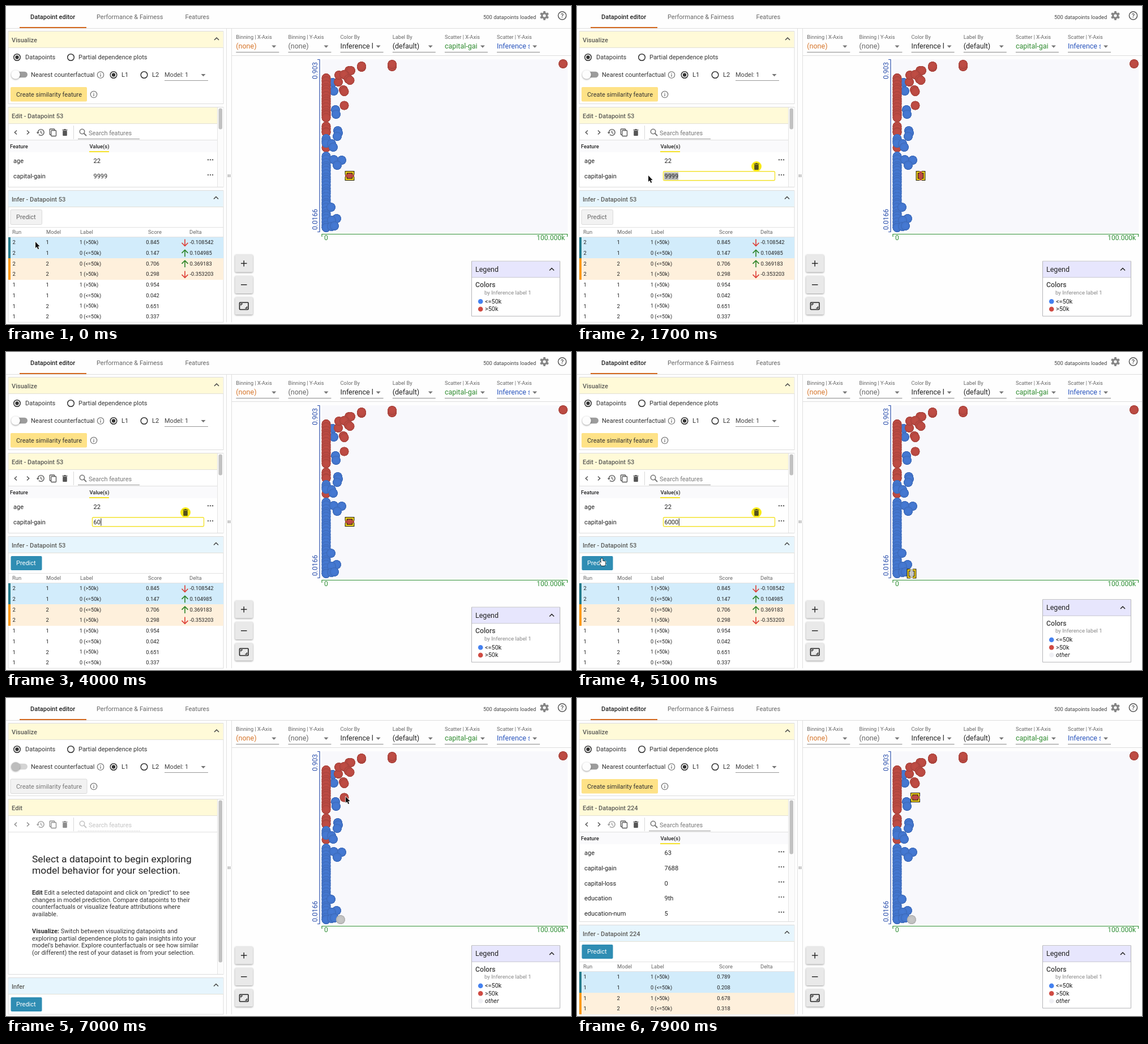
An HTML page with a canvas for the animation above (8000 ms loop, 998 px wide and 561 px high).

```html
<!DOCTYPE html>
<html lang="en">
<head>
<meta charset="utf-8">
<title>Datapoint editor</title>
<style>
html, body { margin: 0; width: 100%; height: 100%; overflow: hidden; background: #fefefe; }
canvas { display: block; }
</style>
</head>
<body>
<canvas id="stage" width="998" height="561"></canvas>
<script>
const c = document.getElementById('stage').getContext('2d');
const LOOP = 8000;
const RED = '#bf4c44', BLUE = '#4579d3', GRAY = '#c6c6c6';
const DARK = '#222', MID = '#666';

// ---------- helpers ----------
function text(s, x, y, size = 11, color = DARK, weight = 400, align = 'left') {
  c.font = `${weight} ${size}px Roboto, sans-serif`;
  c.textAlign = align;
  c.fillStyle = color;
  c.fillText(s, x, y + size * 0.355);
}
function rect(x, y, w, h, fill) { c.fillStyle = fill; c.fillRect(x, y, w, h); }
function round(x, y, w, h, r, fill, stroke, lw = 1) {
  c.beginPath();
  c.roundRect(x, y, w, h, r);
  if (fill) { c.fillStyle = fill; c.fill(); }
  if (stroke) { c.strokeStyle = stroke; c.lineWidth = lw; c.stroke(); }
}
function circle(x, y, r, fill, stroke, lw = 1) {
  c.beginPath();
  c.arc(x, y, r, 0, Math.PI * 2);
  if (fill) { c.fillStyle = fill; c.fill(); }
  if (stroke) { c.strokeStyle = stroke; c.lineWidth = lw; c.stroke(); }
}
function line(pts, color, lw = 1) {
  c.beginPath();
  for (let i = 0; i < pts.length; i += 2) c.lineTo(pts[i], pts[i + 1]);
  c.strokeStyle = color;
  c.lineWidth = lw;
  c.stroke();
}
function poly(pts, fill) {
  c.beginPath();
  for (let i = 0; i < pts.length; i += 2) c.lineTo(pts[i], pts[i + 1]);
  c.closePath();
  c.fillStyle = fill;
  c.fill();
}
function at(x, y, draw) { c.save(); c.translate(x, y); draw(); c.restore(); }
function shadow(on) {
  c.shadowColor = on ? 'rgba(0,0,0,.4)' : 'transparent';
  c.shadowBlur = on ? 3 : 0;
  c.shadowOffsetY = on ? 1 : 0;
}

// ---------- icons ----------
const chevron = (x, y, color = '#444') => line([x - 4, y + 2, x, y - 2, x + 4, y + 2], color, 1.5);
const caretDown = (x, y) => poly([x - 4, y - 2, x + 4, y - 2, x, y + 2.2], '#777');
function trash(x, y, color) {
  rect(x - 4.5, y - 5, 9, 1.4, color);
  rect(x - 1.8, y - 6, 3.6, 1.2, color);
  round(x - 3.8, y - 3, 7.6, 9, 1, color);
}
function info(x, y) {
  circle(x, y, 5.7, null, MID, 1.1);
  rect(x - 0.6, y - 0.8, 1.2, 4, MID);
  rect(x - 0.6, y - 3, 1.2, 1.3, MID);
}
function radio(x, y, on) {
  circle(x, y, 5.8, null, '#333', 1.5);
  if (on) circle(x, y, 3.2, '#333');
}
function gear(x, y) {
  at(x, y, () => {
    for (let i = 0; i < 6; i++) {
      c.rotate(Math.PI / 3);
      poly([-2.2, -4, -1.7, -8, 1.7, -8, 2.2, -4], '#858585');
    }
    circle(0, 0, 4.2, null, '#858585', 3.2);
  });
}
function history(x, y, color) {
  c.beginPath();
  c.arc(x + 0.7, y, 5.4, Math.PI, Math.PI * 2.75);
  c.strokeStyle = color;
  c.lineWidth = 1.4;
  c.stroke();
  poly([x - 7.4, y - 0.3, x - 2, y - 0.3, x - 4.7, y + 2.6], color);
  line([x + 0.6, y - 3, x + 0.6, y + 0.5, x + 3.2, y + 2], color, 1.2);
}
function delta(y, up) {
  const d = up ? -1 : 1, col = up ? '#2b8427' : '#dd3b33';
  line([316, y - 6 * d, 316, y + 5.5 * d], col, 1.6);
  line([310.5, y + 0.3 * d, 316, y + 5.8 * d, 321.5, y + 0.3 * d], col, 1.6);
}

// ---------- header and toolbar ----------
function header() {
  text('Datapoint editor', 43, 19.5, 11, DARK, 500);
  text('Performance & Fairness', 160, 19, 11, MID);
  text('Features', 316.5, 19, 11, MID);
  rect(0, 39, 998, 1, '#dedede');
  rect(24, 37, 118, 2, '#d4691f');
  text('500 datapoints loaded', 843, 19.5, 9.4, '#444');
  gear(951, 17);
  circle(982.5, 17, 7.1, null, '#555', 1.5);
  text('?', 982.5, 17.2, 11, '#555', 500, 'center');
}
const MENUS = [
  ['Binning | X-Axis', '(none)', '#d6752a'],
  ['Binning | Y-Axis', '(none)', MID],
  ['Color By', 'Inference label 1', DARK],
  ['Label By', '(default)', DARK],
  ['Scatter | X-Axis', 'capital-gain', '#2f8b2f'],
  ['Scatter | Y-Axis', 'Inference score 1', '#2a55bd']
];
function menus() {
  MENUS.forEach(([label, value, color], i) => {
    const x = 406.3 + i * 92.15;
    text(label, x, 54.5, 9.25, MID);
    c.save();
    c.beginPath();
    c.rect(x - 1, 60, 59, 20);
    c.clip();
    text(value, x, 71, 12.5, color);
    c.restore();
    caretDown(x + 67, 71.5);
    rect(x, 81, 76, 1, '#888');
  });
  rect(398, 87, 600, 1, '#dedede');
  rect(389, 40, 1, 518, '#e0e0e0');
  rect(398, 40, 1, 518, '#e0e0e0');
  rect(392, 297, 1, 5, '#777');
  rect(395, 297, 1, 5, '#777');
}

// ---------- left side ----------
function panel(y0, y1, title, tint) {
  round(4, y0 + 0.5, 380, y1 - y0 - 1, 0, '#fff', '#dcdcdc');
  rect(4.5, y0 + 1, 379, 29, tint);
  rect(4, y0 + 29, 380, 1, '#e2e0d6');
  text(title, 10, y0 + 16, 11.05, '#5c5c58', 500);
}
function visualize(idle) {
  panel(44, 173, 'Visualize', '#fffad8');
  chevron(372, 58);
  radio(19.5, 90.5, true);
  text('Datapoints', 34, 90.5, 11, '#333');
  radio(114.5, 90.5, false);
  text('Partial dependence plots', 128, 90.5, 11, '#333');
  round(12, 115.8, 26, 10.5, 5.2, idle ? '#d4d4d4' : '#9c9c9c');
  shadow(true);
  circle(17, 121, 7.8, idle ? '#bdbdbd' : '#fdfdfd');
  shadow(false);
  text('Nearest counterfactual', 44, 121, 11, '#333');
  info(167, 121.5);
  radio(190, 121.5, true);
  text('L1', 204, 121.5, 11, '#333');
  radio(244, 121.5, false);
  text('L2', 258, 121.5, 11, '#333');
  text('Model: 1', 280, 121.5, 11, '#444');
  caretDown(348.5, 122);
  rect(280, 131, 77, 1, '#999');
  if (idle) round(8, 143, 135, 25.5, 2, '#f2f2f2', '#dadada');
  else round(8, 143, 135, 25.5, 2, '#fee287');
  text('Create similarity feature', 18, 156, 10.95, idle ? '#777' : '#333');
  info(155, 156);
}
const HELP = [
  'Edit a selected datapoint and click on "predict" to see',
  'changes in model prediction. Compare datapoints to their',
  'counterfactuals or visualize feature attributions where',
  'available.', '',
  'Switch between visualizing datapoints and',
  'exploring partial dependence plots to gain insights into your',
  "model's behavior. Explore counterfactuals or see how similar",
  '(or different) the rest of your dataset is from your selection.'
];
function helpText() {
  text('Select a datapoint to begin exploring', 46, 284, 17.4);
  text('model behavior for your selection.', 46, 303.5, 17.4);
  HELP.forEach((s, i) => {
    const y = 343 + i * 12.75 + (i > 4 ? 4.3 : 0);
    const lead = i === 0 ? 'Edit ' : i === 5 ? 'Visualize: ' : '';
    text(lead, 46, y, 10.95, '#333', 700);
    const w = c.measureText(lead).width;
    text(s, 46 + w, y, 10.95, '#333');
  });
}
function tools(idle, fresh) {
  const col = idle ? '#8c8c8c' : '#555';
  line([19, 219.5, 15.3, 223, 19, 226.5], col, 1.5);
  line([37, 219.5, 40.7, 223, 37, 226.5], col, 1.5);
  history(61, 223, fresh ? '#999' : col);
  round(77.2, 217, 8.6, 10, 1, null, col, 1.3);
  round(79.7, 219.5, 8.8, 10, 1, '#fff', col, 1.3);
  trash(104, 223, col);
  rect(119, 211, 1, 24, '#d8d8d8');
  const s = idle ? '#c4c4c4' : '#777';
  circle(134.5, 221.5, 4.2, null, s, 1.6);
  line([137.5, 224.5, 142, 229], s, 1.9);
  text('Search features', 146, 224, 10.9, s);
  if (idle) for (let x = 127; x < 236; x += 3) rect(x, 234, 1.5, 1, '#ccc');
  else rect(127, 234, 109, 1, '#999');
  rect(4, 236, 369, 1, '#e0e0e0');
}
function featureRow(name, value, i) {
  const y = 273.5 + i * 26.6;
  text(name, 13, y, 11);
  text(value, 154.5, y, 11);
  for (let d = -4; d <= 4; d += 4) circle(361 + d, y - 2.2, 1.2, '#666');
}
function edit(s, bottom) {
  panel(178, bottom, s.id ? 'Edit - Datapoint ' + s.id : 'Edit', '#fffad8');
  rect(373, 179, 11, bottom - 180, '#fcfcfc');
  rect(373, 179, 1, bottom - 180, '#e4e4e4');
  round(375.5, 180.5, 6.5, s.id === 53 ? 37 : s.id ? 95 : 286, 3, '#c2c2c2');
  tools(!s.id, s.id !== 53);
  if (!s.id) return helpText();
  rect(4.5, 237, 368, 21, '#fafafc');
  text('Feature', 7, 247.5, 9.4, DARK, 500);
  text('Value(s)', 147.5, 247.5, 9.4, DARK, 500);
  rect(147, 256, 35, 2, '#f5e22c');
  if (s.id === 224) {
    [['age', '63'], ['capital-gain', '7688'], ['capital-loss', '0'],
     ['education', '9th'], ['education-num', '5']].forEach((r, i) => featureRow(r[0], r[1], i));
    return;
  }
  featureRow('age', '22', 0);
  if (s.focus) {
    round(152.5, 291.8, 197, 16, 2, '#fffffa', '#f3e32f', 1.4);
    if (s.selX < 179) rect(s.selX, 293.5, 179 - s.selX, 13, '#b5b5b5');
  }
  featureRow('capital-gain', s.value, 1);
  if (s.caret) {
    const w = (c.font = '400 11px Roboto, sans-serif', c.measureText(s.value).width);
    rect(155 + w, 293.5, 1, 13, '#222');
  }
  if (s.focus) {
    circle(317, 283, 9, '#f9ea14');
    trash(317, 283, '#54511c');
  }
}
const RUNS = [
  '2|1|1 (>50k)|0.845|-0.108542', '2|1|0 (<=50k)|0.147|0.104985',
  '2|2|0 (<=50k)|0.706|0.369183', '2|2|1 (>50k)|0.298|-0.353203',
  '1|1|1 (>50k)|0.954', '1|1|0 (<=50k)|0.042',
  '1|2|1 (>50k)|0.651', '1|2|0 (<=50k)|0.337'
];
const NEW_RUNS = [
  '1|1|1 (>50k)|0.789', '1|1|0 (<=50k)|0.208',
  '1|2|1 (>50k)|0.678', '1|2|0 (<=50k)|0.318'
];
function infer(s, top) {
  panel(top, 558.5, s.id ? 'Infer - Datapoint ' + s.id : 'Infer', '#e6f5fd');
  chevron(371, top + 13.5);
  const y = top + 34.5;
  if (s.ready) round(8.5, y + 0.5, 55, 25, 2, '#2f8db3');
  else round(8, y, 55.5, 26, 2, '#f2f2f2', '#dadada');
  text('Predict', 18, y + 13, 11, s.ready ? '#fff' : MID);
  if (!s.id) return;
  rect(4, top + 65, 380, 1, '#e2e2e2');
  ['Run', 'Model', 'Label', 'Score', 'Delta'].forEach((h, i) =>
    text(h, [11, 71, 131, 251, 324][i], top + 74, 9.4, MID));
  rect(4, top + 82, 380, 1, '#e2e2e2');
  (s.id === 53 ? RUNS : NEW_RUNS).forEach((row, i) => {
    const ry = top + 92 + i * 18.7;
    const edge = Math.round(ry - 9.3);
    if (i < 4) {
      rect(4, edge, 380, 19, i < 2 ? '#d2ecfb' : '#fef0dc');
      rect(4, edge, 4, 19, i < 2 ? '#257c8c' : '#fb9a12');
    }
    const cells = row.split('|');
    cells.forEach((v, k) => text(v, [11.5, 70.5, 130, 247.3, 324.5][k], ry, k === 2 ? 9.1 : 9.4));
    if (cells[4]) delta(ry + 0.5, cells[4][0] !== '-');
  });
}

// ---------- scatter plot ----------
function sprite(base) {
  const k = document.createElement('canvas');
  k.width = k.height = 64;
  const g = k.getContext('2d');
  const shade = g.createRadialGradient(32, 29, 8, 32, 32, 31);
  shade.addColorStop(0, 'rgba(0,0,0,0)');
  shade.addColorStop(0.7, 'rgba(0,0,0,.03)');
  shade.addColorStop(1, 'rgba(0,0,0,.14)');
  for (const f of [base, shade]) {
    g.beginPath();
    g.arc(32, 32, 31, 0, 7);
    g.fillStyle = f;
    g.fill();
  }
  return k;
}
const BALL = { [RED]: sprite(RED), [BLUE]: sprite(BLUE), [GRAY]: sprite(GRAY) };
const ball = (x, y, col) => c.drawImage(BALL[col], x - 8.3, y - 8.3, 16.6, 16.6);
function balls(col, pts) {
  for (let i = 0; i < pts.length; i += 2) ball(pts[i], pts[i + 1], col);
}
// Crowded balls merge into a band with soft seams.
function column(col, from, to, step) {
  rect(557.6, from, 15.8, to - from, col);
  for (let y = from, i = 0; y <= to; i++, y += step * (0.6 + 0.8 * Math.abs(Math.sin(i * 2.4)))) ball(565.5, y, col);
  ball(565.5, to, col);
}
const REDS = [628, 108, 628, 106, 682, 107, 682, 103, 984, 102, 606, 114, 609, 114, 587, 134, 588, 122,
  599, 122, 597, 121, 605, 129, 607.5, 131, 596, 148, 597.5, 151];
const BLUES = [582, 183, 583, 191, 586, 220, 587, 224, 585, 230, 575, 243, 578, 249,
  579, 271, 593, 272, 585, 281, 574, 355, 584, 375, 575, 378, 575, 389, 580, 388];
function marker(x, y, upright) {
  at(x, y, () => {
    if (upright) c.rotate(Math.PI / 2);
    for (const [col, w] of [['#1c1a00', 4.2], ['#f4d321', 2.2]])
      for (const d of [-1, 1]) line([-6.3, 2 * d, -6.3, 6.3 * d, 6.3, 6.3 * d, 6.3, 2 * d], col, w);
  });
}
function plot(s) {
  rect(558, 94, 434, 305, '#f8f8fc');
  const ax = '#2c50ad', gr = '#2f8f35';
  line([550, 94.5, 554, 94.5, 554, 398.5, 550, 398.5], ax, 1.2);
  line([558, 407, 558, 402.5, 991.5, 402.5, 991.5, 407], gr, 1.2);
  at(546, 114, () => { c.rotate(-Math.PI / 2); text('0.903', 0, 0, 12, ax, 400, 'center'); });
  at(546, 376.5, () => { c.rotate(-Math.PI / 2); text('0.0166', 0, 0, 12, ax, 400, 'center'); });
  text('0', 562, 409, 12, gr);
  text('100.000k', 987, 409, 12, gr, 400, 'right');

  balls(BLUE, [577, 135, 579, 150]);
  column(RED, 127, 197, 4.5);
  column(RED, 212, 223, 4);
  ball(565.5, 250, RED);
  balls(RED, REDS);
  column(BLUE, 234, 242, 4);
  column(BLUE, 265, 391, 4.5);
  balls(BLUE, BLUES);
  ball(597.5, 175.5, RED);
  ball(s.px, s.py, s.moved ? GRAY : RED);
  if (s.id === 53) marker(s.px, s.py, s.flip);
  if (s.id === 224) marker(597.5, 175.5, s.flip);
}
function zoomButtons() {
  for (const y of [454, 491.5, 529]) {
    shadow(true);
    round(404.5, y - 15.5, 31.5, 31, 2, '#e9e9e9');
    shadow(false);
  }
  rect(415, 453.4, 10.5, 1.4, '#222');
  rect(419.5, 449, 1.4, 10.5, '#222');
  rect(415, 491, 10.5, 1.4, '#222');
  round(412.5, 523, 15.5, 12.5, 1, null, '#222', 1.6);
  line([415, 528.5, 415, 525.5, 418, 525.5], '#222', 1.3);
  line([425.5, 530, 425.5, 533, 422.5, 533], '#222', 1.3);
}
function legend(moved) {
  const y = moved ? 436.5 : 450;
  round(822.5, y + 0.2, 156, 547 - y, 0, '#fff', '#b5b5b8');
  rect(823, y + 0.7, 155, 28, '#e7e6fd');
  rect(823, y + 28.3, 155, 1, '#c8c8d0');
  text('Legend', 829, y + 14.5, 12.5);
  chevron(964, y + 14.5, '#222');
  text('Colors', 829, y + 41.8, 12.2, '#444', 500);
  text('by Inference label 1', 845, y + 55.5, 9.6, '#888');
  circle(838.2, y + 71.2, 4.3, '#4481f0');
  text('<=50k', 846, y + 71, 10.9);
  circle(838.2, y + 84.7, 4.3, '#cf4a42');
  text('>50k', 846, y + 84.5, 10.9);
  if (moved) {
    circle(838.2, y + 98, 4.3, '#f0f0f4');
    text('other', 846, y + 97.5, 10.9, DARK, 'italic 400');
  }
}

// ---------- pointer ----------
const PATH = [
  [0, 52, 416], [100, 53, 414], [300, 78, 393], [600, 160, 318], [800, 182, 299], [1000, 182, 298],
  [1600, 126, 299], [4600, 126, 300], [4900, 50, 360], [5000, 44, 364], [5500, 44, 364],
  [6200, 606, 418], [6400, 600, 440], [6600, 648, 300], [6800, 625, 212], [7000, 600, 174],
  [7300, 600, 174], [7900, -7, 404], [8000, -7, 404]
];
function pointerAt(t) {
  let i = 1;
  while (i < PATH.length - 1 && PATH[i][0] <= t) i++;
  const [t0, x0, y0] = PATH[i - 1], [t1, x1, y1] = PATH[i];
  const k = (t - t0) / (t1 - t0), e = k * k * (3 - 2 * k);
  return [x0 + (x1 - x0) * e, y0 + (y1 - y0) * e];
}
function outline(fill, edge) {
  c.lineJoin = 'round';
  c.strokeStyle = edge;
  c.lineWidth = 1.4;
  c.stroke();
  c.fillStyle = fill;
  c.fill();
  c.lineJoin = 'miter';
}
function pointer(x, y, kind) {
  at(x, y, () => {
    if (kind === 'text') {
      line([-2.5, -4.5, 2.5, -4.5], '#222');
      line([0, -4.5, 0, 8], '#222');
      line([-2.5, 8, 2.5, 8], '#222');
      return;
    }
    if (kind === 'hand') {
      c.beginPath();
      c.moveTo(-1.4, 7);
      c.lineTo(-1.4, 1);
      c.quadraticCurveTo(0, -1, 1.3, 1);
      c.lineTo(1.3, 4.5);
      c.lineTo(5.8, 5.5);
      c.quadraticCurveTo(7, 10, 4.8, 13);
      c.lineTo(-0.8, 13);
      c.lineTo(-4.2, 7.6);
      c.quadraticCurveTo(-3.4, 5.6, -1.4, 8);
      c.closePath();
      outline('#fff', '#111');
      return;
    }
    c.beginPath();
    [[0, 0], [0, 11], [2.5, 8.8], [4.3, 13], [6.2, 12.2], [4.4, 8.1], [7.6, 7.9]].forEach(p => c.lineTo(...p));
    c.closePath();
    outline('#111', '#fff');
  });
}

// ---------- timeline ----------
function stateAt(t) {
  const step = Math.round(t / 100);
  const [x, y] = pointerAt(t);
  const typed = t < 3700 ? 0 : t < 3900 ? 1 : t < 4200 ? 2 : t < 4400 ? 3 : 4;
  const go = Math.min(1, Math.max(0, (t - 4600) / 400));
  const glide = go * go * (3 - 2 * go);
  const over = t >= 900 && x > 152 && t < 1700;
  return {
    x, y,
    kind: t >= 3700 && t < 4600 ? '' : over ? 'text' : t >= 4900 && t <= 5500 ? 'hand' : 'arrow',
    id: t < 6600 ? 53 : t < 7200 ? 0 : 224,
    focus: t >= 900,
    value: typed ? '6000'.slice(0, typed) : '9999',
    selX: t < 1000 || typed ? 999 : Math.max(154, x),
    caret: typed > 0 && t < 5700 && (t < 4600 || t % 1000 < 500),
    ready: typed > 0,
    moved: t >= 4700,
    px: 607 - 16 * glide,
    py: 299.5 + 91.5 * glide,
    flip: (step + (t >= 5900 ? 1 : 0)) % 2 === 1
  };
}
function draw(t) {
  const s = stateAt(t);
  const top = s.id === 53 ? 325 : s.id ? 400 : 493;
  rect(0, 0, 998, 561, '#fefefe');
  header();
  menus();
  visualize(!s.id);
  edit(s, top - 5);
  infer(s, top);
  plot(s);
  zoomButtons();
  legend(s.moved);
  if (s.kind) pointer(s.x, s.y, s.kind);
}
const start = performance.now();
function tick(now) {
  const t = Math.max(0, now - start) % LOOP;
  draw(Math.floor(t / 100) * 100);
  requestAnimationFrame(tick);
}
draw(0);
requestAnimationFrame(tick);
</script>
</body>
</html>
```
